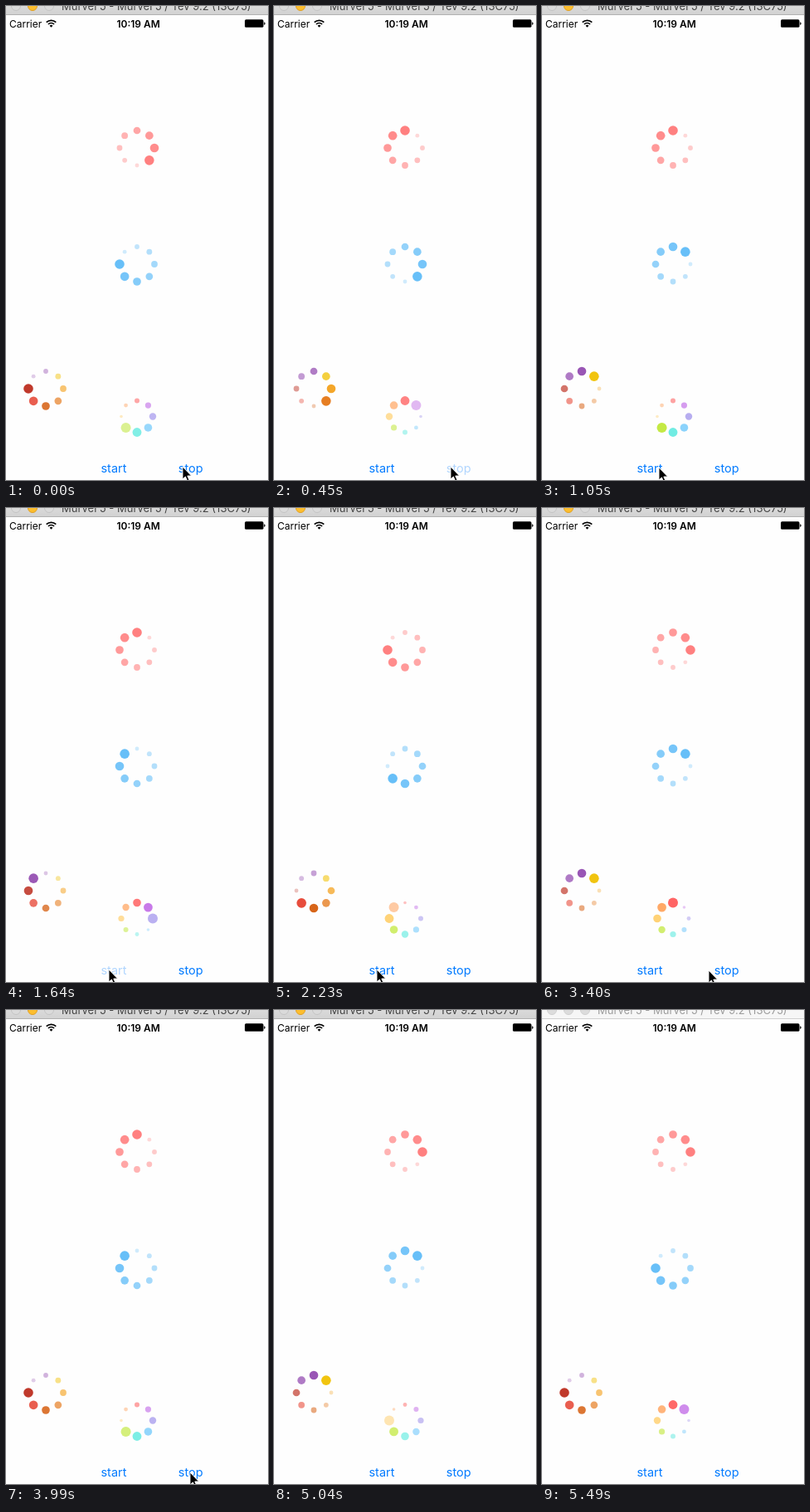
An HTML page that plays this animation: 316x571 px, repeating every 5550 ms.

```html
<!DOCTYPE html>
<html lang="en">
<head>
<meta charset="utf-8">
<title>Loading spinners</title>
<style>
  html, body { margin: 0; width: 100%; height: 100%; overflow: hidden; background: #fefefe; }
  svg { display: block; width: 316px; height: 571px; font-family: Inter, Roboto, sans-serif; }
  .bar { fill: url(#active); }
  .edge { fill: #b2b2b2; }
  .title { font-size: 13px; fill: #444; }
  .light { fill: #dadada; stroke: #c4c4c4; }
  .light.mid { fill: #fdbe2e; stroke: #e0a126; }
  .idle .bar { fill: #f6f6f6; }
  .idle .edge { fill: #d0d0d0; }
  .idle .title { fill: #9c9c9c; }
  .idle .light { fill: #dcdcdc; stroke: #d0d0d0; }
  .button { font-size: 14.5px; fill: #007aff; text-anchor: middle; }
</style>
</head>
<body>
<svg viewBox="0 0 316 571">
  <defs>
    <linearGradient id="active" x1="0" y1="0" x2="0" y2="1">
      <stop offset="0" stop-color="#dadada"/>
      <stop offset="1" stop-color="#d1d1d1"/>
    </linearGradient>
  </defs>
  <rect width="316" height="571" fill="#fefefe"/>

  <g id="window">
    <rect class="bar" width="316" height="11"/>
    <rect class="edge" y="10" width="316" height="1"/>
    <circle class="light" cx="12" cy="0" r="5.5"/>
    <circle class="light mid" cx="32" cy="0" r="5.5"/>
    <circle class="light" cx="52" cy="0" r="5.5"/>
    <text class="title" x="67" y="5">Murvel 5 - Murvel 5 / Tev 9.2 (13C75)</text>
  </g>

  <text x="4" y="25.5" font-size="12">Carrier</text>
  <g fill="none" stroke="#000" stroke-width="1.7">
    <path d="M48.7 19.7a8.2 8.2 0 0 1 11.6 0"/>
    <path d="M50.9 22a5.1 5.1 0 0 1 7.2 0"/>
    <path d="M54.5 25.7l-1.9-2a2.7 2.7 0 0 1 3.8 0z" fill="#000" stroke="none"/>
  </g>
  <text x="159.6" y="25.5" font-size="12" font-weight="600" text-anchor="middle">10:19 AM</text>
  <rect x="288" y="16.3" width="22.5" height="9.5" rx="1.6"/>
  <path d="M311.2 19.2a1.9 1.9 0 0 1 0 3.7z"/>

  <g id="rings"></g>
  <text class="button" id="start" x="130" y="561.5">start</text>
  <text class="button" id="stop" x="222.7" y="561.5">stop</text>
  <path id="cursor" d="M0 0V15L3.4 11.9 5.7 17 8 16 5.8 11H10.6Z" stroke="#fff" stroke-width=".9"/>
</svg>

<script>
const LOOP = 5550;
const STEP = 99;
const $ = id => document.getElementById(id);

// Screen refreshes in evenly spaced runs: first, last, count.
const RUNS = [[0, 1050, 8], [1200, 2230, 8], [2380, 3400, 8], [3550, 4590, 8], [4740, 5490, 6]];
const TICKS = RUNS.flatMap(([a, b, n]) =>
  Array.from({ length: n }, (_, i) => Math.floor((a + (b - a) * i / (n - 1)) / 10) * 10));

const STOP_1 = 500, START = 1575, STOP_2 = 4200;
const PRESSES = [['stop', STOP_1], ['start', START], ['stop', STOP_2]];

// Time, x, y of the pointer tip.
const PATH = [
  [0, 213, 555], [600, 213, 555], [1050, 141, 556], [1350, 124, 556], [2900, 124, 556],
  [3400, 201, 557], [3750, 222, 557], [4400, 222, 557], [4740, 225, 575], [LOOP, 225, 575]
];

const FLAT = ['#8e44ad', '#f1c40f', '#f39c12', '#e67e22', '#d35400', '#e74c3c', '#c0392b', '#9b59b6'];
const RAINBOW = ['#ff3b3b', '#b64fe2', '#8f7fe8', '#5fc2fb', '#4fe8dc', '#b8e41e', '#ffc040', '#ff9340'];

// Position of the leading dot, counted clockwise from the top.
const steady = (from, step = STEP) => t => from + t / step;
const switched = t => t < START
  ? 3.5 + Math.min(t, STOP_1) / STEP
  : (Math.min(t, STOP_2) - START) / STEP;

const fade = age => 1 - age * 0.1;
const pulse = (age, part) => age
  ? 0.68 - 0.05 * age + (0.25 - 0.04 * age) * part
  : 0.4 + 0.6 * part ** 2;

function ring(cx, cy, radius, colors, head, size, shrink, alpha) {
  const dots = Array.from({ length: 8 }, (_, i) => {
    const dot = document.createElementNS('http://www.w3.org/2000/svg', 'circle');
    const angle = i * Math.PI / 4;
    dot.setAttribute('cx', cx + radius * Math.sin(angle));
    dot.setAttribute('cy', cy - radius * Math.cos(angle));
    dot.setAttribute('fill', colors[i % colors.length]);
    return $('rings').appendChild(dot);
  });
  return t => {
    const pos = head(t), lead = Math.floor(pos);
    dots.forEach((dot, i) => {
      const age = (((lead - i) % 8) + 8) % 8;
      dot.setAttribute('r', size - shrink * age);
      dot.setAttribute('opacity', alpha(age, pos - lead));
    });
  };
}

const rings = [
  ring(158, 171, 21, ['#ff8080'], switched, 5.8, 0.48, fade),
  ring(158, 311, 21, ['#67bff8'], steady(6.85), 5.8, 0.48, fade),
  ring(48, 461, 21, FLAT, steady(6.68), 5.8, 0.48, fade),
  ring(158, 494.5, 19, RAINBOW, steady(5.38, 124), 6, 0.6, pulse)
];

function pointer(t) {
  const k = PATH.findIndex(p => p[0] > t);
  const [t0, x0, y0] = PATH[k - 1], [t1, x1, y1] = PATH[k];
  const u = (t - t0) / (t1 - t0);
  return [x0 + (x1 - x0) * u, y0 + (y1 - y0) * u];
}

function draw(t) {
  rings.forEach(update => update(t));
  for (const id of ['start', 'stop']) {
    const down = PRESSES.some(([name, at]) => name === id && t >= at - 75 && t < at + 75);
    $(id).setAttribute('opacity', down ? 0.3 : 1);
  }
  $('cursor').setAttribute('transform', `translate(${pointer(t)})`);
  $('window').classList.toggle('idle', t >= 5400);
}

const begin = performance.now();
function frame() {
  const t = (performance.now() - begin) % LOOP;
  draw(TICKS.findLast(tick => tick <= t));
  requestAnimationFrame(frame);
}
draw(0);
requestAnimationFrame(frame);
</script>
</body>
</html>
```
